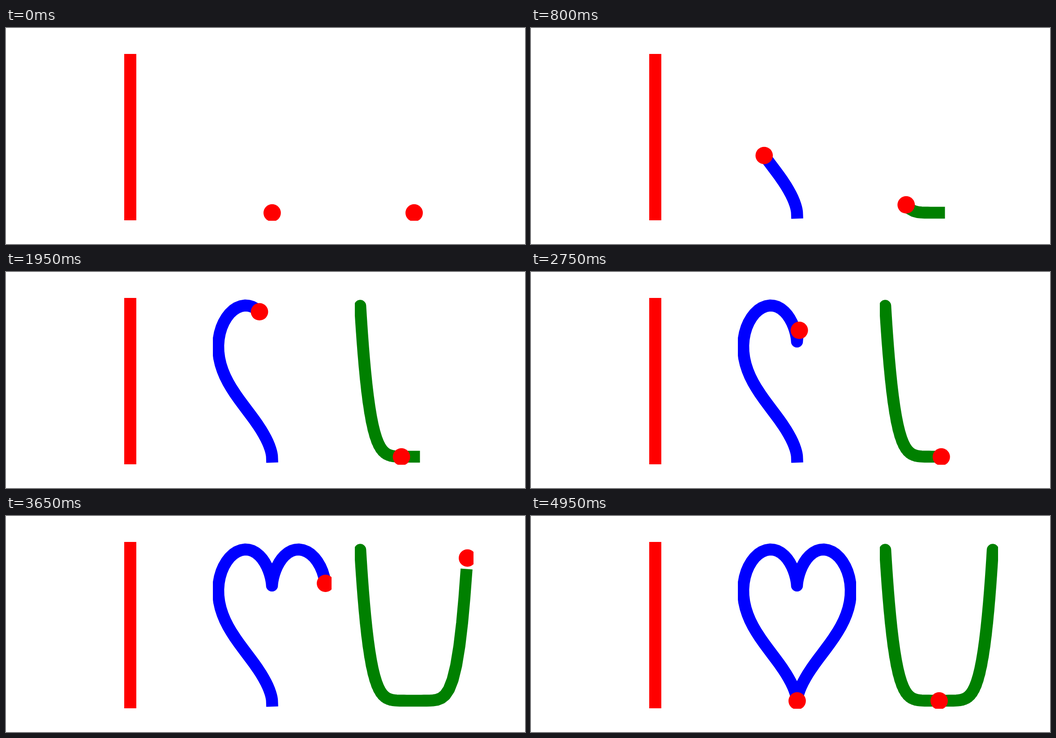
Recreate the animation shown at these times as an HTML page with a canvas. Size 1159 by 483 pixels, loop 5000 ms.

```html
<!DOCTYPE html>
<html lang="en">
<head>
<meta charset="utf-8">
<title>I heart U</title>
<style>
  html, body { margin: 0; width: 100%; height: 100%; overflow: hidden; background: #fff; }
  canvas { display: block; }
</style>
</head>
<body>
<canvas id="stage" width="1159" height="483"></canvas>
<script>
const ctx = document.getElementById('stage').getContext('2d');
const STEPS = 100, STEP_MS = 50;
const PANEL_W = 264, TOP = 58, PANEL_H = 372;
const LINE_W = 80 / 3, DOT_R = 19.4;
const BASE_Y = 412.97, CURVE_H = 338.1, HALF_W = 120.1;
const HEART_MIN = -17, HEART_SPAN = 28.92;

const heartHeight = a =>
  (13 * Math.cos(a) - 5 * Math.cos(2 * a) - 2 * Math.cos(3 * a) - Math.cos(4 * a)
    - HEART_MIN) / HEART_SPAN;
const cupHeight = a => Math.sin(a) ** 18;

function makePanel(left, centre, color, height) {
  const points = Array.from({ length: STEPS }, (_, i) => {
    const a = -Math.PI + 2 * Math.PI * i / (STEPS - 1);
    return [centre + HALF_W * Math.sin(a) ** 3, BASE_Y - CURVE_H * height(a)];
  });
  return { left, color, points };
}

const panels = [
  makePanel(462, 593.99, '#00f', heartHeight),
  makePanel(779, 911.06, '#008000', cupHeight)
];

function clipped(x, y, w, h, paint) {
  ctx.save();
  ctx.beginPath();
  ctx.rect(x, y, w, h);
  ctx.clip();
  ctx.beginPath();
  paint();
  ctx.restore();
}

function drawPanel({ left, color, points }, step) {
  // The trail ends one sample behind the dot.
  if (step > 1) {
    clipped(left, TOP, PANEL_W, PANEL_H, () => {
      ctx.strokeStyle = color;
      ctx.lineWidth = LINE_W;
      ctx.lineCap = 'square';
      ctx.lineJoin = 'round';
      points.slice(0, step).forEach(([x, y]) => ctx.lineTo(x, y));
      ctx.stroke();
    });
  }
  clipped(left, TOP, PANEL_W + 1, PANEL_H + 1, () => {
    const [x, y] = points[step];
    ctx.fillStyle = '#f00';
    ctx.arc(x + 0.4, y + 0.5, DOT_R, 0, 2 * Math.PI);
    ctx.fill();
  });
}

function draw(now) {
  const step = Math.floor(now / STEP_MS) % STEPS;
  ctx.fillStyle = '#fff';
  ctx.fillRect(0, 0, 1159, 483);
  ctx.fillStyle = '#f00';
  ctx.fillRect(264, TOP, 27, PANEL_H);
  panels.forEach(panel => drawPanel(panel, step));
}

let start;
function tick(now) {
  start ??= now;
  draw(Math.max(0, now - start));
  requestAnimationFrame(tick);
}
draw(0);
requestAnimationFrame(tick);
</script>
</body>
</html>
```
